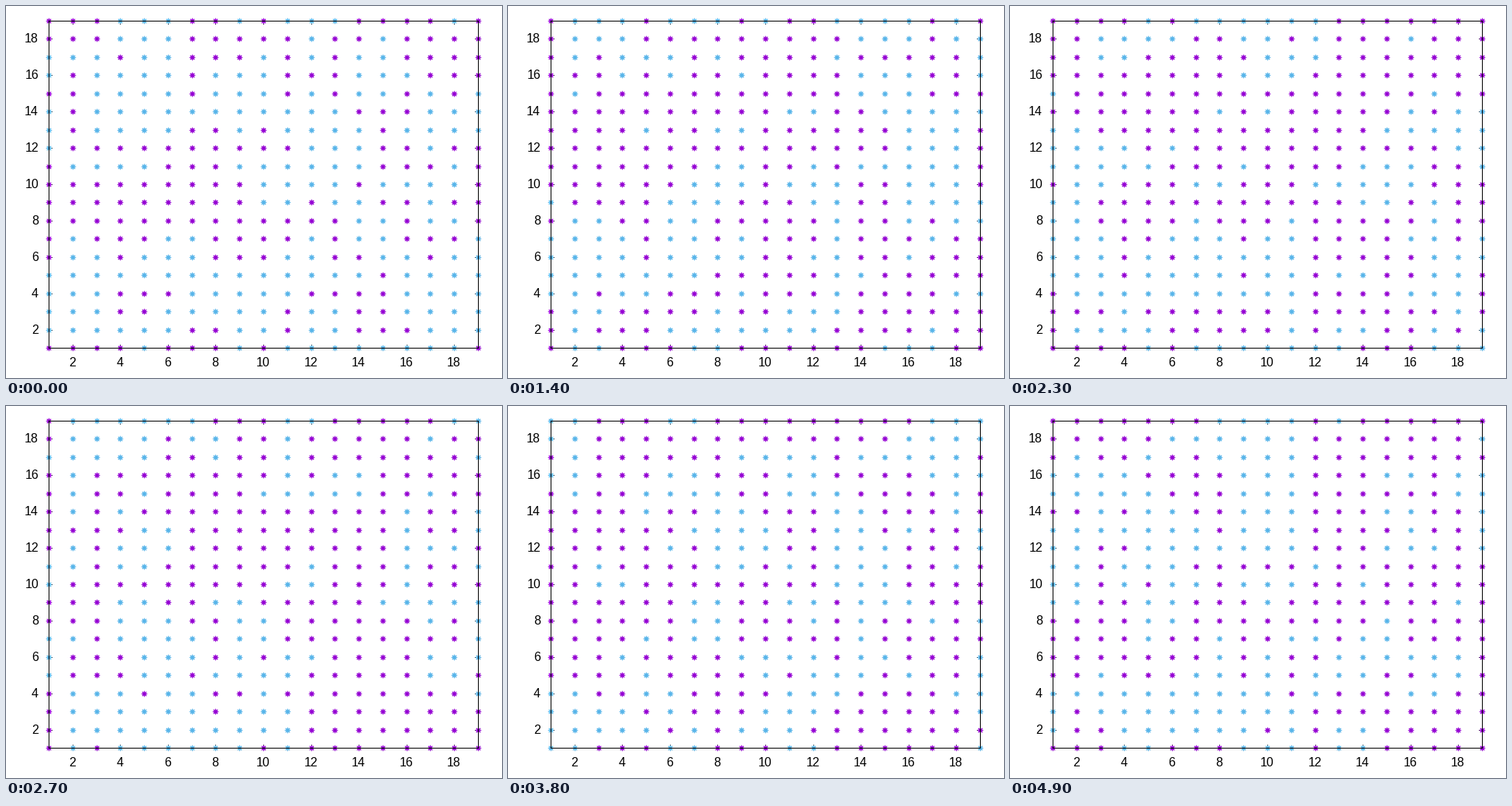
A matplotlib script that plays this animation: 640 by 480 pixels, repeating every 5000 ms.

```python
import numpy as np
import matplotlib.pyplot as plt
from matplotlib.animation import FuncAnimation
from matplotlib.colors import to_rgba

WIDTH, HEIGHT, DPI = 640, 480, 100
PX = 72 / DPI                       # one pixel in points
LEFT, RIGHT, TOP, BOTTOM = 55, 609, 19, 441
SIZE = 19
FRAMES, INTERVAL = 50, 100
TEMPERATURE = 3.6
WARM_UP = 30
UP_COLOR, DOWN_COLOR = to_rgba("#9400d3"), to_rgba("#56b4e9")


def to_x(i):
    return np.round(LEFT + (np.asarray(i) - 1) * (RIGHT - LEFT) / (SIZE - 1))


def to_y(j):
    return np.round(BOTTOM - (np.asarray(j) - 1) * (BOTTOM - TOP) / (SIZE - 1))


def sweep(spins, rng):
    """One Metropolis sweep of the Ising model on a periodic lattice."""
    sites = rng.integers(0, SIZE, (SIZE * SIZE, 2))
    chances = rng.random(SIZE * SIZE)
    for (i, j), chance in zip(sites, chances):
        neighbours = (spins[i - 1, j] + spins[(i + 1) % SIZE, j]
                      + spins[i, j - 1] + spins[i, (j + 1) % SIZE])
        cost = 2 * spins[i, j] * neighbours
        if chance < np.exp(-cost / TEMPERATURE):
            spins[i, j] *= -1


def simulate():
    rng = np.random.default_rng(5)
    spins = rng.choice([-1, 1], (SIZE, SIZE))
    for _ in range(WARM_UP):
        sweep(spins, rng)
    history = []
    for _ in range(FRAMES):
        history.append(spins > 0)
        sweep(spins, rng)
    return history


def draw_frame_and_ticks(ax):
    def line(xs, ys, zorder):
        # Half a pixel moves the stroke onto pixel centres.
        ax.plot(np.array(xs) + 0.5, np.array(ys) + 0.5, color="black", lw=PX,
                solid_capstyle="projecting", solid_joinstyle="miter",
                snap=False, zorder=zorder)

    def label(x, y, value, align):
        ax.text(x, y, str(value), ha=align, va="baseline",
                family="Liberation Sans", size=16 * PX)

    line([LEFT, RIGHT, RIGHT, LEFT, LEFT], [TOP, TOP, BOTTOM, BOTTOM, TOP], 3)
    for value in range(2, SIZE, 2):
        x, y = to_x(value), to_y(value)
        for edge, step in ((LEFT, 4), (RIGHT, -4)):
            line([edge, edge + step], [y, y], 1)
        for edge, step in ((TOP, 4), (BOTTOM, -4)):
            line([x, x], [edge, edge + step], 1)
        label(x, 465, value, "center")
        label(42, y + 5, value, "right")


fig = plt.figure(figsize=(WIDTH / DPI, HEIGHT / DPI), dpi=DPI, facecolor="white")
ax = fig.add_axes([0, 0, 1, 1])
ax.set(xlim=(0, WIDTH), ylim=(HEIGHT, 0))
ax.axis("off")
draw_frame_and_ticks(ax)

history = simulate()
grid_x, grid_y = np.meshgrid(to_x(range(1, SIZE + 1)), to_y(range(1, SIZE + 1)))


def spin_colors(up):
    return np.where(up.reshape(-1, 1), UP_COLOR, DOWN_COLOR)


points = ax.scatter(grid_x.ravel() + 0.5, grid_y.ravel() + 0.5,
                    s=(6.5 * PX) ** 2, marker=(8, 2, 0), linewidths=1.1 * PX,
                    c=spin_colors(history[0]), snap=False, zorder=2)
ax.set(xlim=(0, WIDTH), ylim=(HEIGHT, 0))


def update(frame):
    points.set_color(spin_colors(history[frame]))
    return points,


anim = FuncAnimation(fig, update, frames=FRAMES, interval=INTERVAL,
                     repeat=True, repeat_delay=0)
plt.show()
```
